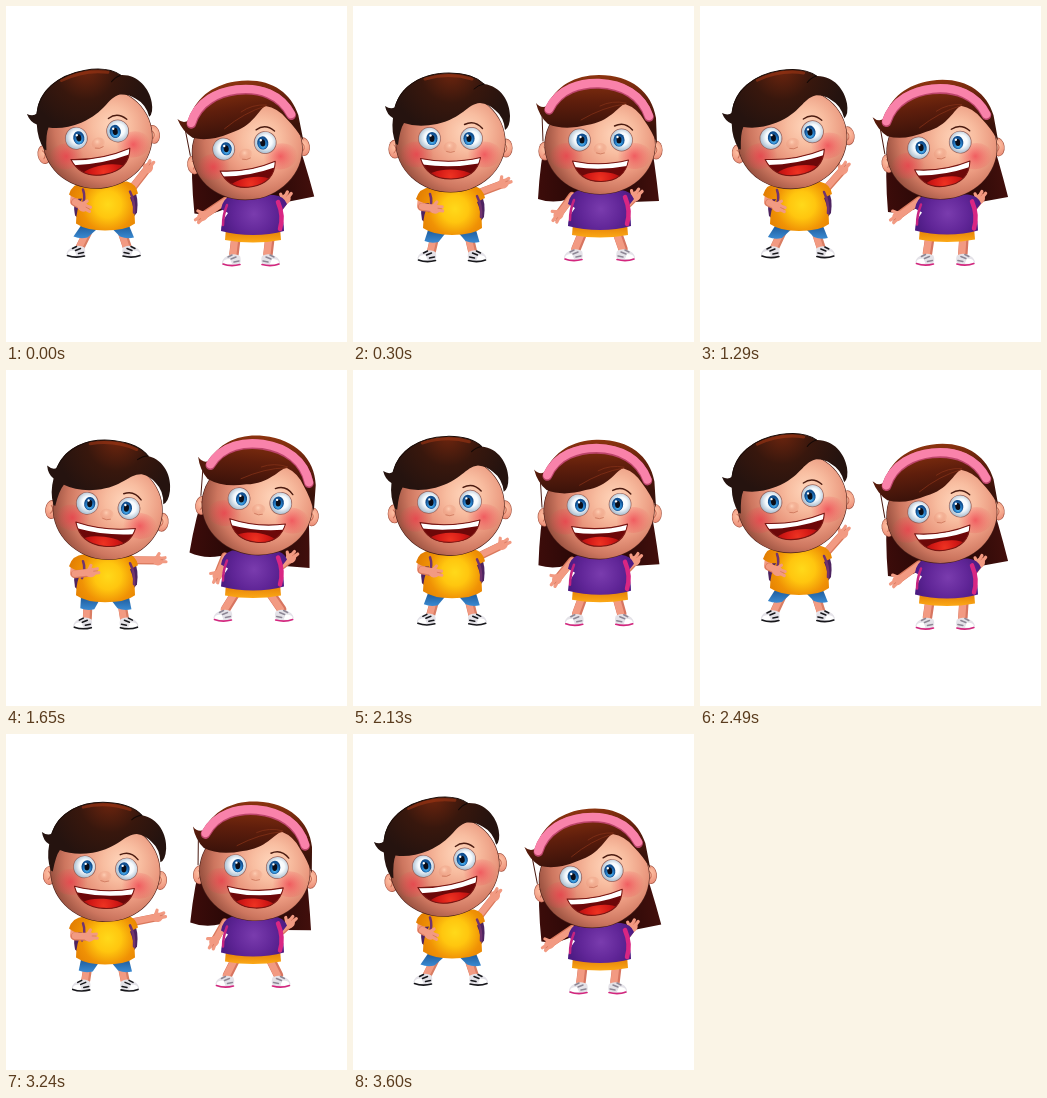
These frames come from a looping animation (341 by 336 pixels, 3.63 s). An HTML page with a canvas:

```html
<!DOCTYPE html>
<html lang="en">
<head>
<meta charset="utf-8">
<title>Swaying children</title>
<style>
html, body { margin: 0; width: 100%; height: 100%; overflow: hidden; background: #fff; }
canvas { display: block; width: 341px; height: 336px; }
</style>
</head>
<body>
<canvas id="stage" width="341" height="336"></canvas>
<script>
const ctx = document.getElementById('stage').getContext('2d');
const LOOP = 3630, STEP = 30, SWAY = 1200;
const SKIN = '#f29a82';

function addStops(gradient, colors) {
  colors.forEach((c, i) => gradient.addColorStop(i / (colors.length - 1), c));
  return gradient;
}

const radial = (x, y, r, ...colors) =>
  addStops(ctx.createRadialGradient(x, y, 0, x, y, r), colors);
const linear = (x0, y0, x1, y1, ...colors) =>
  addStops(ctx.createLinearGradient(x0, y0, x1, y1), colors);

function shape(d, fill) {
  ctx.fillStyle = fill;
  ctx.fill(new Path2D(d));
}

function line(d, color, width) {
  ctx.strokeStyle = color;
  ctx.lineWidth = width;
  ctx.lineCap = ctx.lineJoin = 'round';
  ctx.stroke(new Path2D(d));
}

function oval(x, y, rx, ry, fill) {
  ctx.beginPath();
  ctx.ellipse(x, y, rx, ry, 0, 0, Math.PI * 2);
  ctx.fillStyle = fill;
  ctx.fill();
}

// Draws in the same coordinates, turned about the point (x, y).
function turned(x, y, degrees, draw) {
  ctx.save();
  ctx.translate(x, y);
  ctx.rotate(degrees * Math.PI / 180);
  ctx.translate(-x, -y);
  draw();
  ctx.restore();
}

// Arm from the shoulder at the given angle, ending in a small open hand.
function arm(x, y, degrees, length, thumb) {
  ctx.save();
  ctx.translate(x, y);
  ctx.rotate(degrees * Math.PI / 180);
  line(`M0 0H${length - 6}`, '#d9785c', 8);
  line(`M0 -.5H${length - 6}`, SKIN, 6.5);
  oval(length - 4, 0, 5.5, 4.8, SKIN);
  line(`M${length - 3} -2L${length + 3} -3M${length - 2} 1L${length + 4} 1`, SKIN, 3.2);
  line(`M${length - 6} ${2 * thumb}L${length - 3} ${7 * thumb}`, SKIN, 3.2);
  line(`M${length - 1} -1H${length + 3}`, '#cf6d55', .6);
  ctx.restore();
}

function shoe(x, y, side, trim) {
  ctx.save();
  ctx.translate(x, y);
  ctx.scale(side, 1);
  shape('M-8 -4Q-3 -7 2 -5Q9 -3 10 2Q10 6 4 6L-7 5Q-10 1 -8 -4Z', '#e4e2e8');
  shape('M2 -1Q9 -1 9 3Q6 5 0 4Z', '#fff');
  line('M-8 4.5Q1 7 9 4', trim, 1.6);
  line('M-7 1L-2 2M-4 -3L1 -1M0 -5L4 -3', trim === '#17171b' ? trim : '#8d8795', 1.5);
  ctx.restore();
}

function eye(x, y, side) {
  oval(x, y, 11.4, 11.4, '#9a6259');
  oval(x, y, 10.7, 10.7, radial(x + 1, y - 1, 12, '#fff', '#f6fafd', '#a9bdcf'));
  const ix = x + side * 2.5;
  oval(ix, y, 5.6, 6.6, '#124f8f');
  oval(ix, y + 1, 4.6, 5.2, radial(ix, y + 3, 6, '#66c6f5', '#2a86cf', '#1a63a8'));
  oval(ix, y, 2.5, 3.6, '#0a0d18');
  oval(ix - 1.5, y - 3, 1.2, 1.2, '#fff');
}

function features(x, y, gap, mouthY, mouthWidth) {
  ctx.save();
  ctx.translate(x, y);
  for (const side of [-1, 1]) {
    oval(side * 34, 16, 17, 13, radial(side * 34, 16, 17, 'rgba(240,50,70,.65)', 'rgba(240,70,80,0)'));
    eye(side * gap, 0, -side);
  }
  line('M14 -14Q24 -19 32 -10', '#4b1b10', 1.4);
  oval(0, 9, 7, 6, radial(-1, 7, 8, '#ffcfb4', 'rgba(222,120,92,0)'));
  line('M-4 13Q0 15 4 13', '#cc765b', .8);

  ctx.translate(0, mouthY);
  ctx.scale(mouthWidth / 31, 1);
  const mouth = 'M-31 0Q0 6 31 -1Q27 20 1 20.5Q-24 21 -31 0Z';
  shape(mouth, '#6d0809');
  ctx.save();
  ctx.clip(new Path2D(mouth));
  oval(0, 20, 25, 9, radial(0, 18, 25, '#ee3322', '#d41a16', '#a50c0d'));
  shape('M-32 -1Q0 7 32 -2L29 5Q0 10 -29 6Z', '#fff');
  ctx.restore();
  line(mouth, '#791612', 1.1);
  ctx.restore();
}

function ear(x, y) {
  oval(x, y, 6.6, 9.5, '#a65845');
  oval(x, y, 6, 8.8, radial(x, y - 2, 10, '#ffc3a5', '#ed917a'));
  line(`M${x - 1} ${y - 4}Q${x + 3} ${y} ${x - 1} ${y + 4}`, '#c96d57', 1);
}

function face(x, y, rx, ry) {
  oval(x, y, rx + .6, ry + .6, '#4a1f18');
  oval(x, y, rx, ry, radial(x + 16, y - 10, 76, '#ffd6bc', '#f8bda0', '#eb9a80', '#cd765f', '#8c4838'));
}

function boyHead(p) {
  ear(42, 143);
  ear(153, 142);
  face(97.5, 136, 54.5, 50);
  shape('M43 138Q38 126 40 112Q34 109 32 100Q38 104 42 101C47 80 68 67 96 67Q120 67 131 78C148 80 157 96 157 110Q157 121 152 124Q151 111 142 104Q136 98 127 97C114 98 110 112 84 118Q65 122 51 117Q47 123 45 139Z',
    radial(98, 66, 62, '#6e250e', '#38170d', '#25130f'));
  line('M131 78Q125 79 121 83', '#120806', 1);
  line('M72 73Q96 66 119 73', 'rgba(165,55,20,.55)', 3);
  line('M42 101C48 80 69 67 96 67Q120 67 131 78', '#1b0d09', 1);
  features(97.5, 132.5, 21, 20, 30);
}

function girlBackHair() {
  shape('M194 125Q187 156 185 193Q200 198 216 193L278 196L306 195Q302 157 296 124Z',
    linear(186, 130, 306, 130, '#3c0c0a', '#1f0605', '#420f0c'));
}

function girlHead(p) {
  ear(192, 145);
  ear(303, 144);
  face(247, 139, 55, 49);
  shape('M195 118Q186 110 183 97Q188 103 194 100C203 80 222 69 246 69C278 69 299 86 303 112L304 138Q299 125 291 114Q284 102 272 98C265 100 257 116 234 119Q211 125 195 118Z',
    linear(0, 69, 0, 122, '#8c340f', '#5f1e0c', '#3a120a'));
  line('M196 104C206 83 228 77.5 246 78C270 79 289 90 296 111', '#bc456b', 9.6);
  line('M196 103C206 82 228 76.5 246 77C270 78 289 89 296 110', '#f982aa', 8.4);
  line('M189 108L190 135', '#4a1b12', 1);
  line('M272 98Q250 101 228 114M273 97Q259 94 247 100', '#813017', .8);
  features(247.5 - 2.5 * p, 134, 21, 21, 28);
}

function boyLegs(p) {
  for (const side of [-1, 1]) {
    const top = 99 + side * 14;
    const foot = side < 0 ? 74.5 - 4 * p : 123.5 + 1.5 * p;
    const ankle = foot - side * 4;
    line(`M${top + side * 3} 230L${ankle} 245`, '#d97d63', 9);
    line(`M${top + side * 3 - 1} 230L${ankle - 1} 245`, SKIN, 6.5);
    ctx.lineCap = 'butt';
    shape(`M${top - 10} 224H${top + 10}L${ankle + 7} 236Q${ankle} 238 ${ankle - 7} 235Z`,
      linear(0, 223, 0, 237, '#1d5796', '#3a8bd3'));
    shoe(foot, 250, side, '#17171b');
  }
}

function boy(p) {
  ctx.save();
  ctx.translate(0, -4.5 * p);
  shape('M73 188Q66 200 69 214L76 220H124L131 211Q133 196 128 188Z', '#4d2360');
  boyLegs(p);
  arm(126, 187, -21 - 31 * p, 30, -1);
  line('M69 191L68 200', SKIN, 8);
  shape('M78 181Q66 182 63 193Q69 198 76 197Q70 208 70 222Q80 229 99 229Q120 229 129 222Q129 207 124 196L132 192Q130 182 121 180Z',
    radial(102, 203, 40, '#ffd91a', '#ffc60f', '#f09205', '#e27d02'));
  line('M77 188Q80 196 76 205M124 190Q129 200 128 211', '#70336f', 2.5);
  arm(69, 201, 8 + 20 * p, 17 - 4 * p, -1);
  turned(98, 170, -10 * p, () => boyHead(p));
  ctx.restore();
}

function girlLegs(p) {
  for (const side of [-1, 1]) {
    const top = 247 + side * 17;
    const foot = side < 0 ? 221 + 5 * p : 272 - 8 * p;
    line(`M${top} 226L${foot - side * 2} 243`, '#d77560', 9.5);
    line(`M${top - 1} 226L${foot - side * 2 - 1} 243`, SKIN, 7);
    shoe(foot, 249, side, '#d3267e');
  }
}

function girl(p) {
  ctx.save();
  ctx.translate(0, 5 * p);
  turned(247, 176, -9 * p, girlBackHair);
  girlLegs(p);
  shape('M220 217H274L275 229Q247 234 219 229Z', linear(0, 218, 0, 233, '#e07a05', '#ffae18'));
  arm(275 - 2 * p, 198 - p, -45 - 8 * p, 15, -1);
  arm(219, 190, 126 + 20 * p, 27 + 4 * p, 1);
  shape('M226 184Q217 187 215 198L222 202Q215 211 215 220Q230 224 247 224Q264 224 278 220Q278 209 274 202L281 193Q278 185 268 184Z',
    radial(248, 203, 40, '#7a3cae', '#612698', '#43167a'));
  line('M272 191Q278 205 274 218', '#d92683', 4.5);
  line('M221 194Q217 204 217 214', '#c52481', 2.5);
  turned(247, 176, -9 * p, () => girlHead(p));
  ctx.restore();
}

function frame() {
  const elapsed = performance.now() % LOOP;
  const time = Math.floor(elapsed / STEP) * STEP;
  const p = Math.cos(time / SWAY * Math.PI * 2);
  ctx.fillStyle = '#fff';
  ctx.fillRect(0, 0, 341, 336);
  boy(p);
  girl(p);
  requestAnimationFrame(frame);
}
frame();
</script>
</body>
</html>
```
